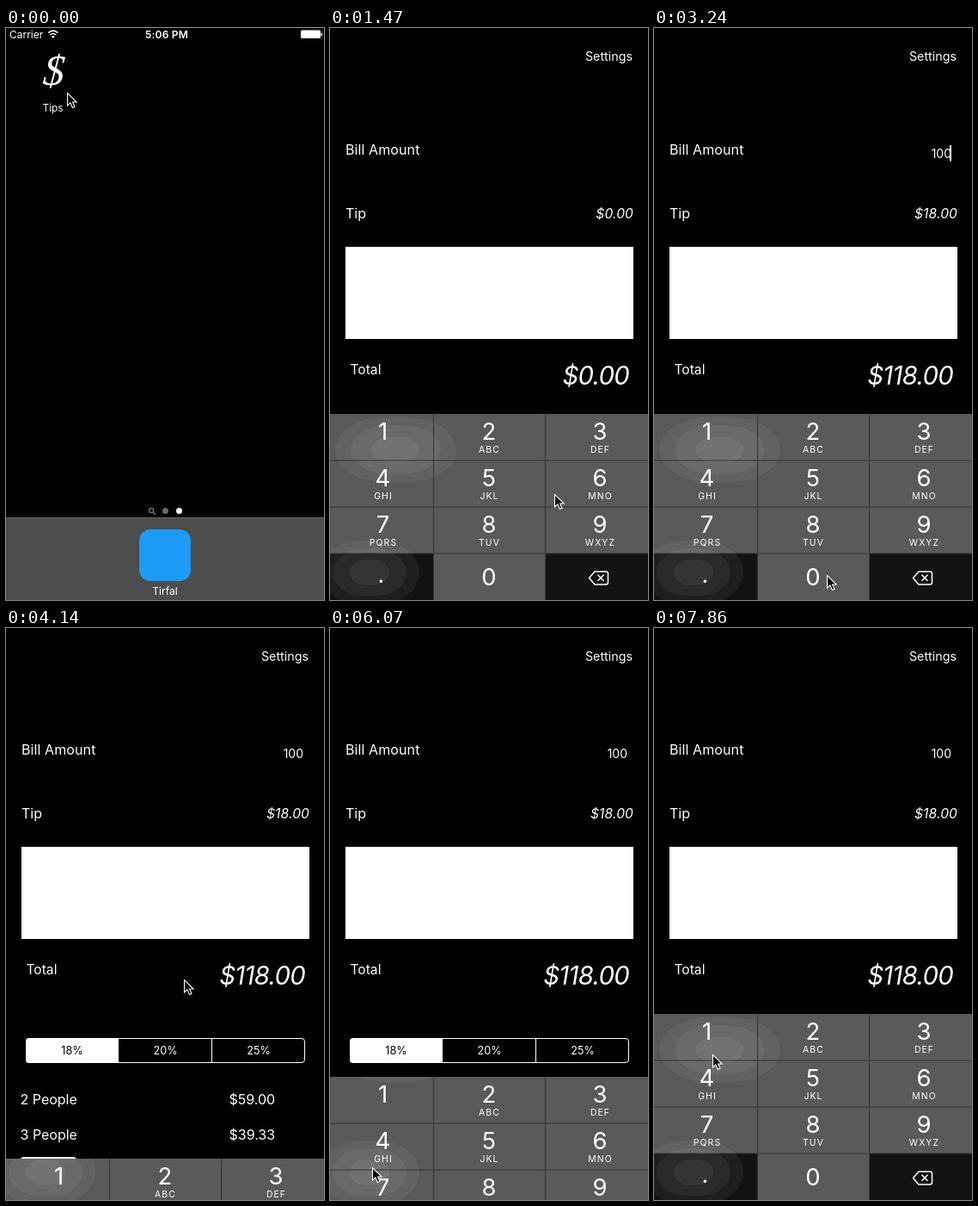
An HTML page that plays this animation: 370 px wide and 664 px high, repeating every 8 s.

```html
<!DOCTYPE html>
<html lang="en">
<head>
<meta charset="utf-8">
<title>Tip calculator</title>
<style>
  html, body { margin: 0; width: 100%; height: 100%; overflow: hidden; background: #000; }
  svg { display: block; width: 100vw; height: 100vh; fill: #fff; font-family: Inter, "Open Sans", sans-serif; }
  .line { fill: none; stroke: #fff; }
  .it { font-style: italic; }
  .mid { text-anchor: middle; }
  .end { text-anchor: end; }
</style>
</head>
<body>
<svg id="stage" viewBox="0 0 370 664" xmlns="http://www.w3.org/2000/svg"></svg>
<script>
const LOOP = 8000, STEP = 148.15, PAD_TOP = 448, PAD_H = 216;

const text = (x, y, size, str, attrs = '') =>
  `<text x="${x}" y="${y}" font-size="${size}" ${attrs}>${str}</text>`;
const rect = (x, y, w, h, attrs = '') =>
  `<rect x="${x}" y="${y}" width="${w}" height="${h}" ${attrs}/>`;
const MID = 'class="mid"';

function homeScreen() {
  return rect(0, 0, 370, 664, 'fill="#000"') +
    '<g id="tipIcon" transform="translate(42 65.5) skewX(-5)">' +
      text(0, 0, 50, '$', 'font-family="Liberation Serif, serif" font-style="italic"') + '</g>' +
    text(54.5, 97, 11.8, 'Tips', MID) +
    '<circle cx="169" cy="560" r="2.6" fill="none" stroke="#777" stroke-width="1.3"/>' +
    '<path d="M171 562l2.6 2.6" stroke="#777" stroke-width="1.5"/>' +
    '<circle cx="185.5" cy="560.5" r="3.5" fill="#6a6a6a"/>' +
    '<circle cx="201.5" cy="560.5" r="3.5"/>' +
    rect(0, 568, 370, 96, 'fill="#4d4d4d"') + rect(0, 568, 370, 1, 'fill="#626262"') +
    rect(155, 582, 60, 60, 'rx="13" fill="#1d9bf6"') +
    text(185, 658, 12, 'Tirfal', MID);
}

function statusBar() {
  return text(4, 11.5, 12, 'Carrier') +
    '<path class="line" stroke-width="1.6" d="M49.2 5.6q5.6-5 11.2 0M51.3 8q3.5-3 7 0"/>' +
    '<path d="M54.8 12l-2-2.2q2-1.5 4 0z"/>' +
    text(187, 11.5, 12, '5:06 PM', 'class="mid" font-weight="600" letter-spacing=".2"') +
    rect(343, 2.5, 23, 9.5, 'rx="1.5"') + rect(366.6, 5.5, 1.4, 4, 'rx=".7"');
}

function calculator() {
  const seg = ['18%', '20%', '25%'].map((s, i) =>
    text(77 + 108.5 * i, 495, 12.6, s, MID + (i ? '' : ' fill="#000"'))).join('');
  const row = (y, name, sum) => text(16.5, y, 16, name) + text(259.5, y, 16, sum);
  return rect(0, 0, 370, 664, 'fill="#000"') +
    text(352, 37.5, 14.3, 'Settings', 'class="end"') +
    text(18, 147.3, 16, 'Bill Amount', 'letter-spacing=".1"') +
    text(346, 151, 14, '', 'id="bill" class="end"') +
    rect(344, 136, 2, 18.5, 'id="caret"') +
    text(18, 220.5, 16, 'Tip') +
    text(353, 220.5, 15.6, '', 'id="tip" class="it end" letter-spacing=".1"') +
    rect(18, 254, 335, 107) +
    text(23.5, 401.5, 15.6, 'Total') +
    text(348, 413.5, 29.3, '', 'id="total" class="it end" letter-spacing="-.7"') +
    rect(23.5, 476.5, 324, 28, 'rx="3.5" class="line"') +
    '<path d="M131 476H27q-4 0-4 4v21q0 4 4 4h104z"/>' +
    rect(239, 477, 1, 27) + seg +
    row(552.5, '2 People', '$59.00') + row(593.5, '3 People', '$39.33') +
    rect(16, 614, 67, 30, 'rx="5"') +
    `<g id="keyboard" clip-path="url(#pad)">${keyboard()}</g>`;
}

// The white controls glow through the translucent pad.
const glow = (cx, cy, w, h) => [1, .74, .4].map(k =>
  rect(cx - w * k / 2, cy - h * k / 2, w * k, h * k,
    `rx="${w * k * .42}" ry="${h * k / 2}" fill-opacity=".05"`)).join('');

function keyboard() {
  const letters = ['', 'ABC', 'DEF', 'GHI', 'JKL', 'MNO', 'PQRS', 'TUV', 'WXYZ'];
  // The outer keys run slightly past the screen edge.
  const edges = [-3, 121, 251, 373], mids = [61.5, 185, 314];
  let keys = '', labels = '', lines = '';
  for (let i = 0; i < 12; i++) {
    const c = i % 3, y = PAD_TOP + 54 * Math.floor(i / 3);
    keys += rect(edges[c], y, edges[c + 1] - edges[c], 54, `id="key${i}"`);
    if (c === 0 && i) lines += rect(-3, y - .5, 376, 1);
    if (i < 9) {
      labels += text(mids[c], y + 29.5, 27.5, i + 1, MID) +
        text(mids[c] + .5, y + 45.2, 10.4, letters[i], 'class="mid" letter-spacing="1.1"');
    }
  }
  lines += rect(120, PAD_TOP, 1, PAD_H) + rect(250, PAD_TOP, 1, PAD_H);
  return keys +
    `<g id="glow">${glow(76.5, 489.5, 141, 76)}${glow(46, 632, 116, 74)}</g>` +
    `<g fill="#353535">${lines}</g>` + labels +
    text(185, 647, 27.5, '0', MID) + text(59.5, 644, 27, '.', MID) +
    '<path class="line" stroke-width="1.5" stroke-linejoin="round" ' +
    'd="M301.5 638.5l6.5-7.5h13q2.5 0 2.5 2.5v10q0 2.5-2.5 2.5h-13zM311.5 634.8l7 7m0-7l-7 7"/>';
}

const stage = document.getElementById('stage');
stage.innerHTML =
  `<defs><clipPath id="pad">${rect(-3, PAD_TOP, 376, PAD_H)}</clipPath></defs>` +
  `<g id="home">${homeScreen()}</g><g id="app">${calculator()}</g><g id="status">${statusBar()}</g>` +
  '<path id="cursor" fill="#000" stroke="#fff" stroke-width="1.1" ' +
  'd="M.5 .5V15l3.4-3.1 2.5 5.6 2.6-1.2-2.5-5.3h4.6z"/>';
const el = {};
stage.querySelectorAll('[id]').forEach(n => el[n.id] = n);

// Pointer moves: first step, last step, destination.
const moves = [
  [1, 5, 66, 86], [6, 10, 261, 541], [11, 15, 62, 480], [17, 19, 201, 635], [22, 25, 207, 408],
  [28, 33, 48, 643], [34, 39, 49, 626], [47, 50, 302, 637], [51, 53, 68, 495]
];
// Key taps: step of release, key index, digit.
const taps = [[17, 0, '1'], [20, 10, '0'], [22, 10, '0'], [51, 11, '']];

const span = (s, a, b) => Math.max(0, Math.min(1, (s - a) / (b - a)));
const easeInOut = p => p < .5 ? 2 * p * p : 1 - 2 * (1 - p) ** 2;
const money = v => '$' + v.toFixed(2);
const shift = (node, x, y) => node.setAttribute('transform', `translate(${x} ${y})`);
const scaleFrom = (node, x, y, sx, sy) =>
  node.setAttribute('transform', `translate(${x * (1 - sx)} ${y * (1 - sy)}) scale(${sx} ${sy})`);
const fade = (node, v) => node.setAttribute('opacity', v);

function drawLaunch(s) {
  const rest = 1 - span(s, 2, 7), home = 1 - span(s, 2, 5), grow = 1.8 - home * .8;
  scaleFrom(el.app, 33, 22, 1 - rest ** 3.07, 1 - rest ** 2.64);
  scaleFrom(el.home, 55, 50, grow, grow);
  fade(el.app, span(s, 2, 4));
  fade(el.home, home);
  fade(el.status, rest ** 2.5);
  fade(el.tipIcon, s === 2 ? .5 : 1);
}

function drawKeyboard(s) {
  const dy = PAD_H * (s < 40 ? easeInOut(span(s, 26, 29)) : (1 - span(s, 40, 44)) ** 3.77);
  shift(el.keyboard, 0, dy);
  shift(el.glow, 0, -dy);
  for (let i = 0; i < 12; i++) {
    const down = taps.some(([step, key]) => key === i && s === step - 1);
    const dark = i === 9 || i === 11;
    el['key' + i].setAttribute('fill', down !== dark ? '#131313' : '#5a5a5a');
  }
}

function draw(s) {
  let x = 71, y = 75;
  for (const [from, to, tx, ty] of moves) {
    const p = easeInOut(span(s, from, to));
    x += (tx - x) * p;
    y += (ty - y) * p;
  }
  shift(el.cursor, x, y);
  drawLaunch(s);
  drawKeyboard(s);

  const bill = taps.filter(([step]) => s >= step).map(tap => tap[2]).join('');
  el.bill.textContent = bill;
  el.tip.textContent = money(bill * .18);
  el.total.textContent = money(bill * 1.18);
  fade(el.caret, s < 26 && (bill || s % 8 >= 4) ? 1 : 0);
}

let last = -1;
function tick() {
  const s = Math.min(53, Math.floor((performance.now() % LOOP + 20) / STEP));
  if (s !== last) draw(last = s);
  requestAnimationFrame(tick);
}
tick();
</script>
</body>
</html>
```
